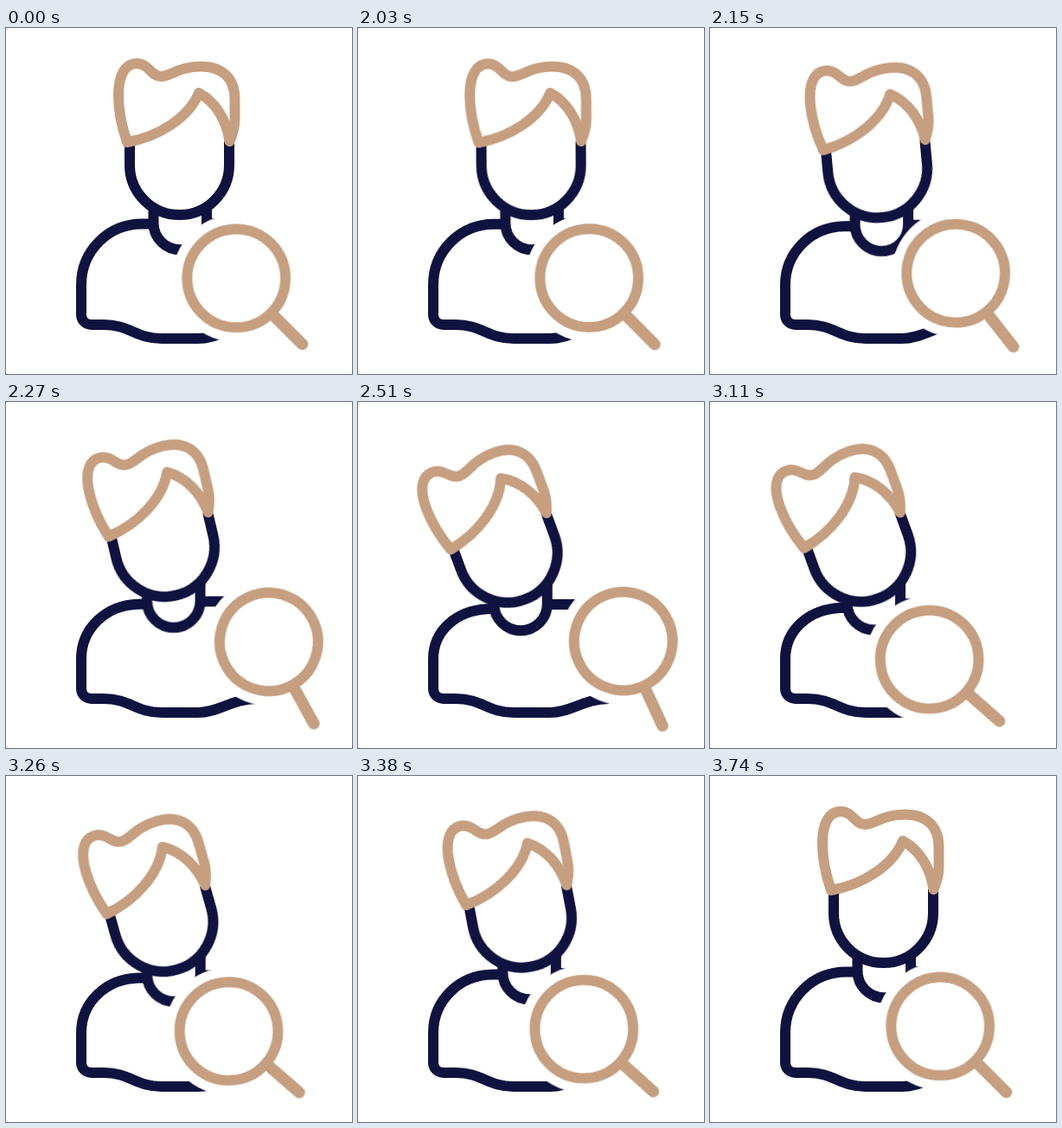
Write an HTML page that moves like this. It is 400 by 400 pixels and loops after 3.77 s.

```html
<!DOCTYPE html>
<html lang="en">
<head>
<meta charset="utf-8">
<title>Person search</title>
<style>
  html, body { margin: 0; width: 100%; height: 100%; overflow: hidden; background: #fff; }
  svg { display: block; width: 100vw; height: 100vh; }

  path, circle, line { fill: none; stroke-width: 12; stroke-linejoin: round; }
  .navy { stroke: #10123f; }
  .tan { stroke: #c69f80; stroke-linecap: round; }
  .face { fill: #fff; }
  .gap { fill: #fff; stroke: none; }
  .handle { stroke-width: 13.5; }

  .torso, .upper, .head, .glass, .tilt {
    animation: 3770ms cubic-bezier(.333, 0, .667, 1) infinite both;
  }
  .torso { animation-name: torso; }
  .upper { animation-name: upper; }
  .head { animation-name: head; transform-origin: 215px 202px; }
  .glass { animation-name: glass; }
  .tilt { animation-name: tilt; }

  /* Rest until 2000 ms, look, sweep, settle by 3740 ms */
  @keyframes torso {
    0%, 53.05%, 94.43%, 100% {
      d: path("M170 226.5 L157 226.5 C118 226.5 87 258 87 297 L87 331 C87 338 92 343 99 343 L113 343 C143 343 150 359 180 359 L222 359 C246 359 261 343 290 343");
    }
    66.31%, 79.58% {
      d: path("M158 239 L150 239.3 C114 241 87 264 87 297 L87 331 C87 338 92 343 99 343 L113 343 C143 343 150 359 180 359 L222 359 C246 359 261 343 290 343");
    }
    79.58% { animation-timing-function: cubic-bezier(.35, 0, .5, 1); }
  }
  @keyframes upper {
    0%, 53.05%, 94.43%, 100% { transform: translate(0px, 0px); }
    66.31%, 79.58% { transform: translate(-13.3px, 8px); }
    79.58% { animation-timing-function: cubic-bezier(.35, 0, .5, 1); }
  }
  @keyframes head {
    0%, 53.05%, 99.2%, 100% { transform: rotate(0deg); }
    64.99%, 80.9% { transform: rotate(-20.3deg); }
    80.9% { animation-timing-function: cubic-bezier(.35, 0, .5, 1); }
  }
  @keyframes glass {
    0%, 53.05%, 99.2%, 100% { transform: translate(266.2px, 289.3px); }
    61.8%, 65.78% { transform: translate(307.3px, 276.2px); }
    79.05% {
      transform: translate(252.5px, 298.4px);
      animation-timing-function: cubic-bezier(.35, 0, .5, 1);
    }
  }
  @keyframes tilt {
    0%, 53.05%, 99.2%, 100% { transform: rotate(0deg); }
    63.4%, 64.72% { transform: rotate(20.8deg); }
    84.35% { transform: rotate(-4.2deg); }
  }
</style>
</head>
<body>
<svg viewBox="0 0 400 400">
  <path class="navy torso" d="M170 226.5 L157 226.5 C118 226.5 87 258 87 297 L87 331 C87 338 92 343 99 343 L113 343 C143 343 150 359 180 359 L222 359 C246 359 261 343 290 343"/>
  <g class="upper">
    <path class="navy" d="M170.5 196 V225.5 A30.75 30.75 0 0 0 232 225.5 V196 M232 226 H272"/>
    <g class="head">
      <path class="navy face" d="M143 132 V158.5 A57.5 57.5 0 0 0 258 158.5 V131"/>
      <path class="tan" d="M140 132 C133 112 130 95 130 78 C130 54 138 41 151 41 C165 41 168 56 179 56
        C190 56 200 44.5 225 44.5 C250 44.5 264.5 58 264.5 82 V105 C264.5 118 261 124 258.5 131
        C255 107 243 86 223 75 C211 104 176 126 140 132 Z"/>
    </g>
  </g>
  <g class="glass">
    <circle class="gap" r="74"/>
    <g class="tilt">
      <circle class="tan" r="56.8"/>
      <line class="tan handle" x1="41" y1="41" x2="76.3" y2="76.3"/>
    </g>
  </g>
</svg>
</body>
</html>
```
